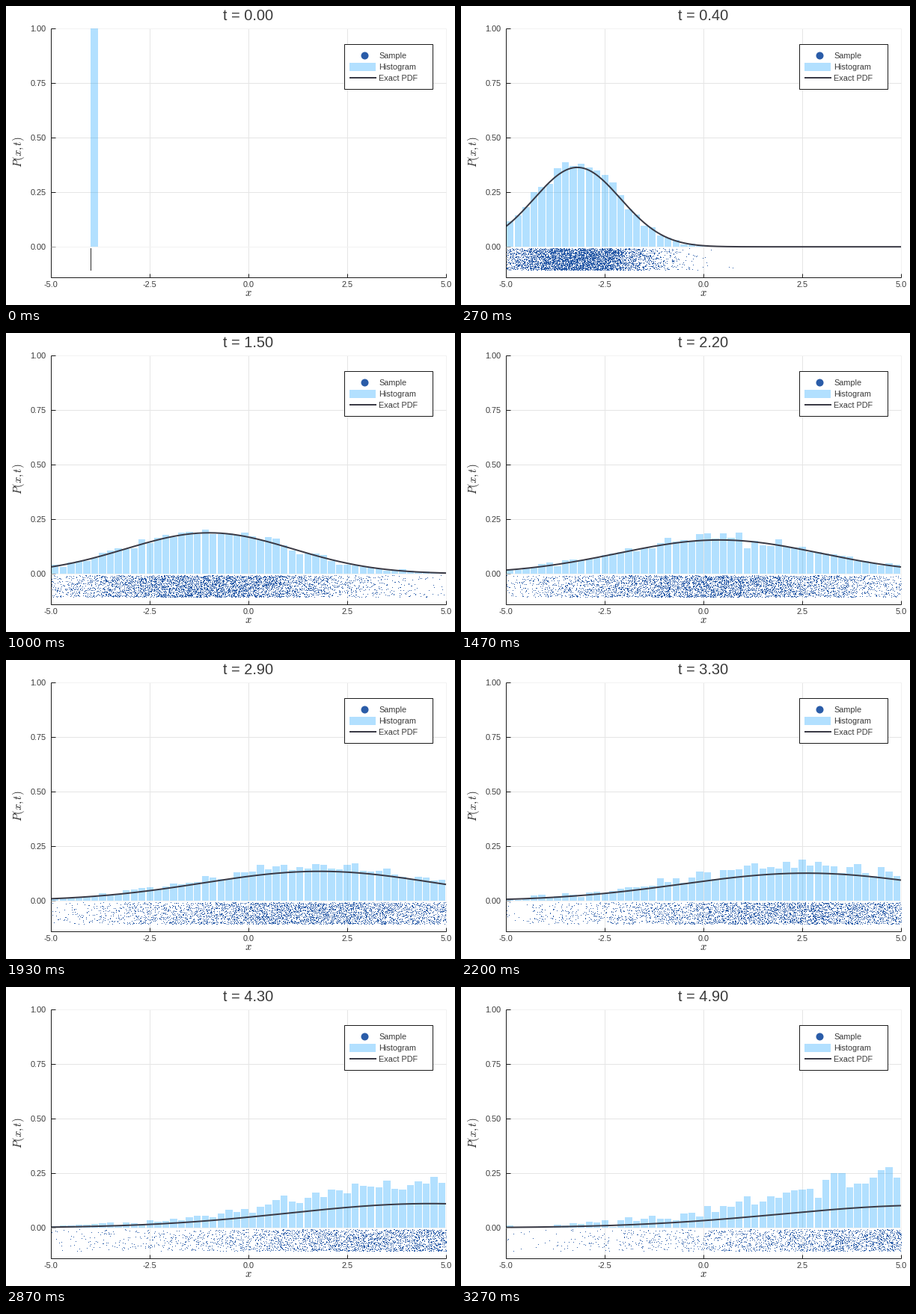
A matplotlib script for the animation above (3340 ms loop, 600 by 400 pixels).

```python
import math

import matplotlib.pyplot as plt
import numpy as np
from matplotlib.animation import FuncAnimation
from matplotlib.collections import LineCollection, PolyCollection
from matplotlib.patches import Circle, Rectangle

plt.rcParams.update({
    "font.family": "Liberation Sans",
    "mathtext.fontset": "cm",
    "toolbar": "None",
})

WIDTH, HEIGHT, DPI = 600, 400, 100
PT = 72 / DPI
TICK_MS, TICKS, STEPS, DT = 10, 334, 50, 0.1

TOP, BOTTOM, RIGHT, UNIT = 30.45, 363.0, 588.0, 291.7
START, DRIFT, SPREAD = -4.0, 2.0, 3.0
WALKERS = 5000

INK, TEXT = "#1c1c1c", "#3a3a3a"
BAR, DOT, CURVE = (0, 0.6, 1, 0.3), "#2a5ca8", "#3a3a45"

X_TICKS = [-5, -2.5, 0, 2.5, 5]
Y_TICKS = [0, 0.25, 0.5, 0.75, 1]
EDGES = np.linspace(-5, 5, 51)
CURVE_X = np.linspace(-5, 5, 201)

# Drifting Brownian walkers, one row per time step.
rng = np.random.default_rng(7)
kicks = rng.normal(DRIFT * DT, math.sqrt(SPREAD * DT), (STEPS, WALKERS))
kicks[0] = START
paths = np.cumsum(kicks, axis=0)
rug = rng.uniform(-0.11, -0.01, WALKERS)


def to_y(value):
    return TOP + (1 - value) * UNIT


def to_x(value, left):
    return left + (value + 5) / 10 * (RIGHT - left)


fig = plt.figure(figsize=(WIDTH / DPI, HEIGHT / DPI), dpi=DPI, facecolor="white")
ax = fig.add_axes([0, 0, 1, 1])
ax.set(xlim=(0, WIDTH), ylim=(HEIGHT, 0))
ax.axis("off")


def label(x, y, text, px=10.9, ha="center", **kw):
    kw = {"va": "baseline", "color": TEXT, "zorder": 8} | kw
    return ax.text(x, y, text, fontsize=px * PT, ha=ha, **kw)


def line(xs, ys, color, width, **kw):
    return ax.plot(xs, ys, color=color, lw=width * PT,
                   solid_capstyle="butt", **kw)[0]


grid = ax.add_collection(LineCollection([], linewidths=PT, zorder=1))
spines = ax.add_collection(LineCollection([], linewidths=PT, zorder=5))
bars = ax.add_collection(PolyCollection([], facecolors=[BAR], linewidths=0, zorder=2))
curve = line([], [], CURVE, 2, zorder=4)
dots, = ax.plot([], [], ",", color=DOT, zorder=3)

title = label(323.6, 19, "", 20)
x_labels = [label(0, 376, f"{v:.1f}") for v in X_TICKS]
for v in Y_TICKS:
    label(53.4, to_y(v) + 3.6, f"{v:.2f}", ha="right")
x_name = label(324, 384.5, "$x$", 14.6, va="center", color=INK)
label(17, 195.5, "$P(x,t)$", 14.6, va="center", rotation=90, color=INK)

# Legend
ax.add_patch(Rectangle((452, 51), 118, 60, fc="white", ec=INK, lw=PT, zorder=6))
ax.add_patch(Circle((479.5, 66.5), 5, fc=DOT, lw=0, zorder=7))
ax.add_patch(Rectangle((459, 76), 35, 11, fc=BAR, lw=0, zorder=7))
line([459, 494.5], [96.4, 96.4], CURVE, 2, zorder=7)
for row, name in enumerate(["Sample", "Histogram", "Exact PDF"]):
    label(498.4, 70.3 + 15 * row, name, ha="left")


def place_axes(left):
    xs = [to_x(v, left) for v in X_TICKS]
    ys = [to_y(v) for v in Y_TICKS]
    grid.set_segments([[(x, TOP), (x, BOTTOM)] for x in xs[1:]]
                      + [[(left, y), (RIGHT, y)] for y in ys])
    faint, normal = "#f2f2f2", "#e5e5e5"
    grid.set_color([normal] * 3 + [faint] * 2 + [normal] * 3 + [faint])

    spines.set_segments([[(left, TOP), (left, BOTTOM)], [(left, BOTTOM), (RIGHT, BOTTOM)]]
                        + [[(x, BOTTOM), (x, BOTTOM - 5)] for x in xs]
                        + [[(left, y), (left + 6, y)] for y in ys])
    spines.set_color([INK] * 7 + ["#a0a0a0"] + [INK] * 4)
    for text, x in zip(x_labels, xs):
        text.set_x(x - 0.3)
    x_name.set_x(xs[2])


def bar_shapes(values, left, gap):
    heights = np.histogram(values, EDGES, density=True)[0]
    base = to_y(0)
    shapes = []
    for a, b, h in zip(EDGES, EDGES[1:], heights):
        if h > 0:
            x0, x1 = to_x(a, left) + gap, to_x(b, left) - gap
            y = to_y(min(h, 1))
            shapes.append([(x0, base), (x0, y), (x1, y), (x1, base)])
    return shapes


def update(tick):
    step = min(int((tick + 0.5) * 0.15), STEPS - 1)
    t = step * DT
    left, gap = (60.45, 0.6) if step else (60, 0)
    place_axes(left)
    title.set_text(f"t = {t:.2f}")

    values = paths[step]
    bars.set_verts(bar_shapes(values, left, gap))
    seen = (values >= -5) & (values <= 5)
    dots.set_data(to_x(values[seen], left), to_y(rug[seen]))
    dots.set_color(DOT if step else "#2b2b2b")

    if step:
        var = SPREAD * t
        density = (np.exp(-(CURVE_X - START - DRIFT * t) ** 2 / (2 * var))
                   / math.sqrt(2 * math.pi * var))
        curve.set_data(to_x(CURVE_X, left), to_y(density))
    else:
        curve.set_data([], [])
    return []


animation = FuncAnimation(fig, update, frames=TICKS, interval=TICK_MS,
                          repeat=True, repeat_delay=0, cache_frame_data=False)
plt.show()
```
